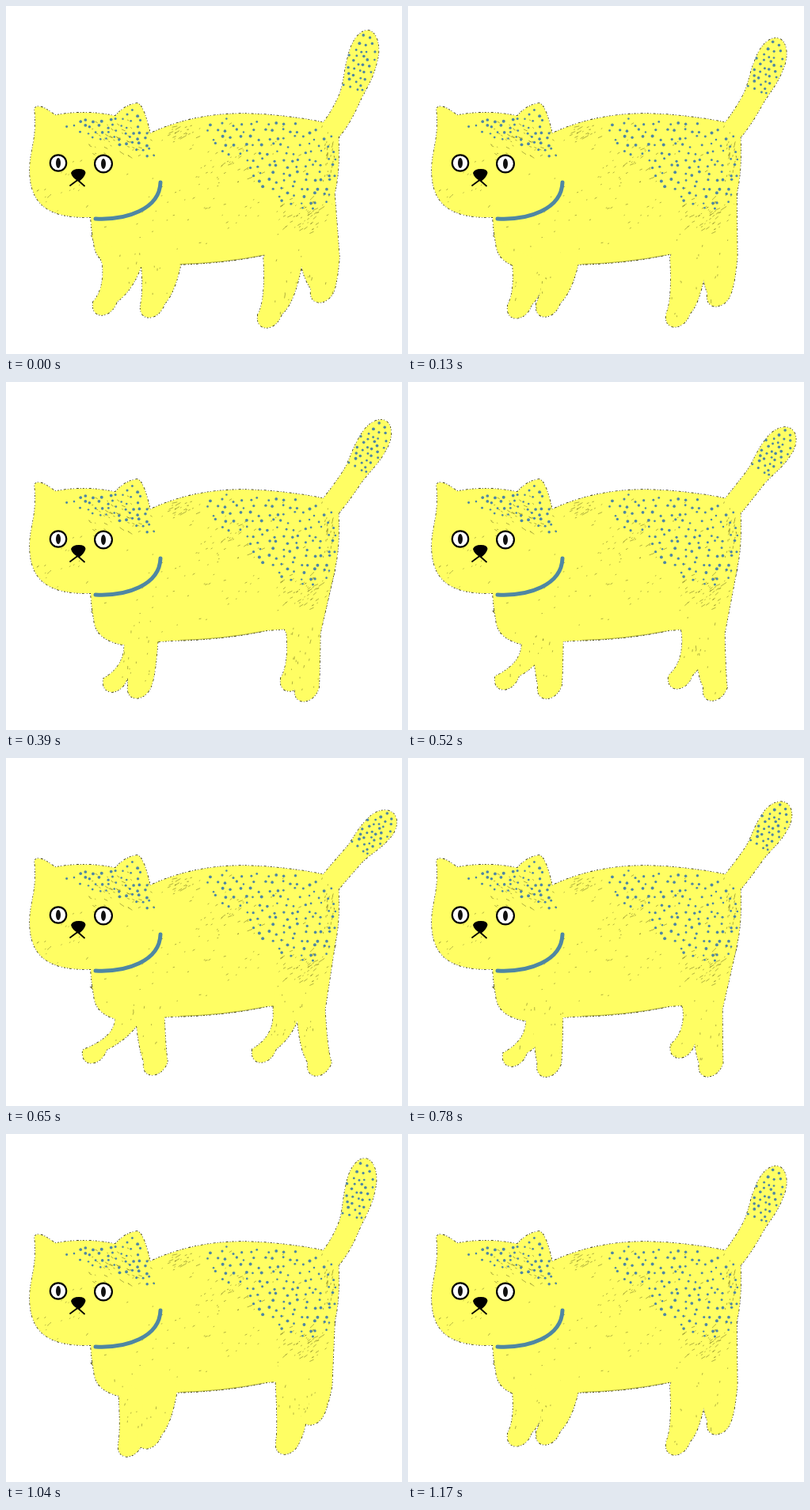
These frames come from a looping animation (500 px wide and 440 px high, 1.3 s). An HTML page with a canvas:

```html
<!DOCTYPE html>
<html>
<head>
<meta charset="utf-8">
<style>
html, body { margin: 0; width: 100%; height: 100%; overflow: hidden; background: #fff; }
canvas { display: block; width: 500px; height: 440px; }
</style>
</head>
<body>
<canvas id="stage" width="500" height="440"></canvas>
<script>
const ctx = document.getElementById('stage').getContext('2d');
const STEP = 130;
const ORDER = [0, 1, 2, 3, 4, 5, 6, 7, 8, 1];
const YELLOW = '#fffe63', BLUE = '#4f87a3', SCRATCH = 'rgba(65,65,10,.7)';

const lerp = (a, b, t) => a + (b - a) * t;

function randomizer(seed) {
  return () => {
    seed = (seed * 1664525 + 1013904223) >>> 0;
    return seed / 4294967296;
  };
}

// Point on a track of key points, given by step.
function track(keys, step) {
  const times = Object.keys(keys).map(Number);
  const i = Math.max(1, times.findIndex(t => t >= step));
  const from = times[i - 1], to = times[i], t = (step - from) / (to - from);
  return keys[from].map((v, k) => lerp(v, keys[to][k], t));
}

const body = new Path2D(`M107 267C60 268 29 256 30 205C31 180 40 165 36 130Q40 121 62 138
  Q100 131 138 139Q150 125 165 123Q173 122 182 161Q235 136 300 136Q350 137 400 147
  Q420 152 420 168C421 215 419 245 388 310L330 314Q275 326 210 327L146 332
  Q112 325 111 300Q108 285 107 267Z`);

// Each leg: where it joins the body, and the path of its sole.
const frontTop = { left: [108, 290], right: [213, 290], y: 326 };
const rearTop = { left: [340, 290], right: [415, 238], y: 318 };
const LEGS = [
  { top: frontTop, hip: 78, sole: { 0: [125, 392], 1: [141, 396], 3: [169, 401], 5: [189, 402], 8: [157, 409] } },
  { top: frontTop, hip: 94, sole: { 0: [185, 395], 1: [177, 394], 3: [138, 393], 5: [112, 387], 8: [181, 399] } },
  { top: rearTop, hip: 167, sole: { 0: [333, 408], 1: [341, 407], 3: [380, 405], 5: [396, 403], 8: [356, 406] } },
  { top: rearTop, hip: 176, sole: { 0: [400, 376], 1: [393, 381], 3: [362, 392], 5: [326, 386], 8: [388, 369] } }
];
const TAIL_TIP = { 0: [458, 31], 1: [468, 41], 3: [479, 49], 5: [489, 70], 8: [454, 31] };

// The hip follows the foot part of the way; the thigh is thinnest mid-cycle.
function legPath({ top, hip, sole }, step) {
  const [x, bottom] = track(sole, step), r = 15, y = bottom - r;
  const mid = hip + .55 * x, half = lerp(18, 25, Math.abs(step - 5) / 5);
  const left = mid - half, right = mid + half;
  const path = new Path2D();
  path.moveTo(...top.left);
  path.lineTo(left, top.y);
  path.quadraticCurveTo(left + 3, y - 20, x - r, y - 3);
  path.bezierCurveTo(x - r - 4, y + r * 1.3, x + r * .5, y + r * 1.3, x + r, y - 3);
  path.quadraticCurveTo(lerp(right, x + r, .35), y - 18, right, top.y);
  path.lineTo(...top.right);
  path.closePath();
  return path;
}

// Tail: a bending spine with a thick rounded end.
function makeTail(step) {
  const tip = track(TAIL_TIP, step), base = [410, 157], bend = [442, 118];
  const half = t => {
    const bulge = Math.min(1, Math.max(0, (t - .4) / .35));
    const cap = Math.max(0, (t - .8) / .2);
    return (13.5 + 5 * bulge * bulge * (3 - 2 * bulge)) * Math.sqrt(Math.max(0, 1 - cap * cap));
  };
  const at = (t, side) => {
    const a = base.map((v, k) => lerp(v, bend[k], t));
    const b = bend.map((v, k) => lerp(v, tip[k], t));
    const dx = b[0] - a[0], dy = b[1] - a[1], len = Math.hypot(dx, dy);
    return [lerp(a[0], b[0], t) - dy / len * side, lerp(a[1], b[1], t) + dx / len * side];
  };
  const path = new Path2D();
  for (let i = -50; i <= 50; i++) {
    const t = 1 - (i / 50) ** 2;
    path.lineTo(...at(t, Math.sign(i) * half(t)));
  }
  path.closePath();
  return { path, at, half };
}

function dot(x, y, r) {
  ctx.beginPath();
  ctx.arc(x, y, r, 0, 7);
  ctx.fill();
}

// Staggered, jittered dots inside an outline.
function spots(outline, gapX, gapY, seed) {
  const rnd = randomizer(seed), area = new Path2D(outline);
  ctx.fillStyle = BLUE;
  for (let y = 122, row = 0; y < 268; y += gapY, row++)
    for (let x = 60 + (row % 2) * gapX / 2; x < 422; x += gapX) {
      const px = x + (rnd() - .5) * gapX * .6, py = y + (rnd() - .5) * gapY * .6;
      const r = 1.2 + rnd() * .8;
      if (ctx.isPointInPath(area, px, py)) dot(px, py, r);
    }
}

function tailSpots({ at, half }) {
  const rnd = randomizer(21);
  ctx.fillStyle = BLUE;
  for (let row = 0; row < 9; row++) {
    const t = .52 + row * .054;
    for (let side = row % 2 ? -16 : -12; side < 17; side += 8) {
      const p = at(t + (rnd() - .5) * .03, side + (rnd() - .5) * 4);
      if (Math.abs(side) < half(t) - 2) dot(...p, 1.3 + rnd() * .7);
    }
  }
}

function scratches(rnd, count, cx, cy, rx, ry, angle, length) {
  ctx.strokeStyle = SCRATCH;
  ctx.lineWidth = .6;
  ctx.beginPath();
  for (let i = 0; i < count; i++) {
    const x = cx + (rnd() + rnd() - 1) * rx, y = cy + (rnd() + rnd() - 1) * ry;
    const a = angle + (rnd() - .5) * .4, l = .6 + rnd() * rnd() * length;
    ctx.moveTo(x, y);
    ctx.lineTo(x + Math.cos(a) * l, y + Math.sin(a) * l);
  }
  ctx.stroke();
}

function within(path, paint) {
  ctx.save();
  ctx.clip(path);
  paint();
  ctx.restore();
}

function bodyTexture() {
  const rnd = randomizer(7);
  scratches(rnd, 80, 255, 230, 165, 95, -.4, 3);
  scratches(rnd, 30, 220, 160, 42, 18, -.4, 9);
  scratches(rnd, 25, 285, 195, 45, 28, -.5, 6);
  scratches(rnd, 60, 378, 266, 40, 26, -.6, 9);
  scratches(rnd, 30, 408, 200, 12, 50, -1.4, 5);
  scratches(rnd, 45, 138, 170, 48, 30, .5, 7);
  scratches(rnd, 20, 75, 225, 42, 38, -.8, 3);
}

function line(path, color, width) {
  ctx.strokeStyle = color;
  ctx.lineWidth = width;
  ctx.stroke(new Path2D(path));
}

function eye(x, y, r) {
  ctx.fillStyle = '#000';
  dot(x, y, r + 1);
  ctx.fillStyle = '#fff';
  dot(x, y, r - 1.2);
  ctx.fillStyle = '#111';
  ctx.beginPath();
  ctx.ellipse(x, y, 3, 6.5, 0, 0, 7);
  ctx.fill();
}

function face() {
  eye(66, 198.5, 10.3);
  eye(123, 199.5, 11);
  ctx.fillStyle = '#000';
  ctx.fill(new Path2D('M82 211Q84 206 92 206Q100 206 100.500 211Q99 217 92 222Q83 217 82 211Z'));
  line('M81 227L90.500 220L99 227.500', '#000', 1.8);
}

function draw(step) {
  const legs = LEGS.map(leg => legPath(leg, step));
  const tail = makeTail(step);
  const parts = [body, ...legs, tail.path];
  ctx.fillStyle = '#fff';
  ctx.fillRect(0, 0, 500, 440);

  // Broken edge first, so only its outer rim stays visible.
  ctx.lineCap = 'butt';
  ctx.strokeStyle = '#333310';
  ctx.lineWidth = 1.5;
  ctx.setLineDash([2, 2, 1, 3, 3, 2, 1, 2]);
  parts.forEach(p => ctx.stroke(p));
  ctx.setLineDash([]);
  ctx.fillStyle = YELLOW;
  parts.forEach(p => ctx.fill(p));

  ctx.lineCap = 'round';
  within(body, bodyTexture);
  const rnd = randomizer(step + 40);
  legs.forEach((leg, i) => within(leg, () =>
    scratches(rnd, 20, i < 2 ? 160 : 370, 350, 55, 58, 1.7, 4)));
  line('M220 326.500Q275 325 326 315', 'rgba(90,90,20,.6)', .8);
  spots('M248 142Q330 136 416 160L416 240Q395 262 372 260Q320 235 290 195Q255 175 248 142Z', 11.5, 9, 5);
  spots('M75 152Q110 132 140 142L165 126Q188 175 188 200Q165 178 115 170Z', 9.5, 7.5, 12);
  tailSpots(tail);
  line('M113 269C152 271 194 257 195 223', BLUE, 5);
  face();
}

const start = performance.now();
let shown = -1;
function tick() {
  const step = ORDER[Math.floor((performance.now() - start) / STEP) % ORDER.length];
  if (step !== shown) draw(shown = step);
  requestAnimationFrame(tick);
}
tick();
</script>
</body>
</html>
```
